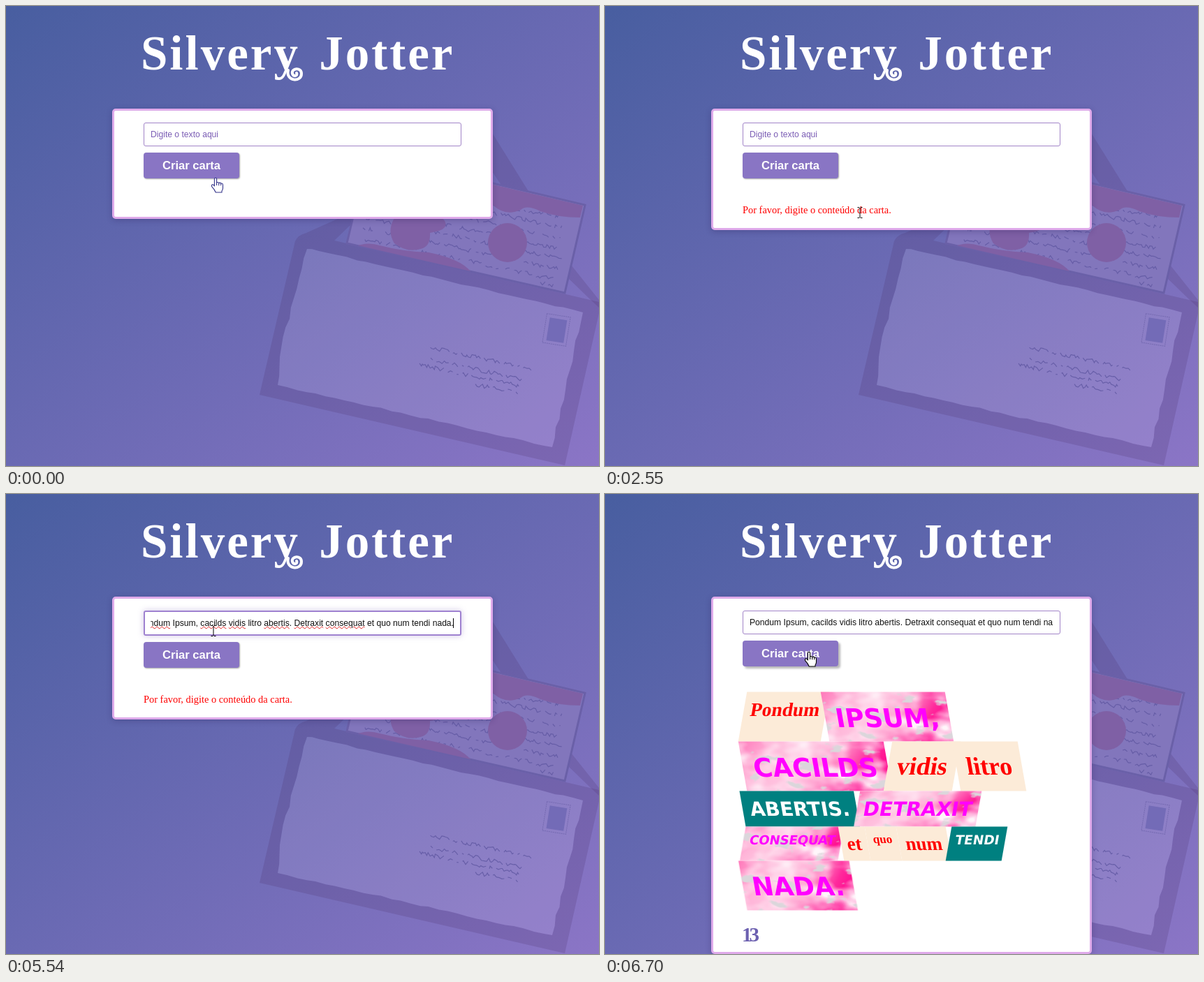
Write an HTML page that moves like this. It is 849 px wide and 659 px high and loops after 8000 ms.

```html
<!DOCTYPE html>
<html lang="pt">
<head>
<meta charset="utf-8">
<title>Silvery Jotter</title>
<style>
html, body { margin: 0; width: 100%; height: 100%; overflow: hidden; }
#stage {
  position: relative; width: 849px; height: 659px; overflow: hidden;
  background: linear-gradient(to bottom right, #485ea0, #8b75c6);
}
#stage > * { position: absolute; box-sizing: border-box; }
svg { left: 0; top: 0; }
.title { font: bold 69px "Liberation Serif", serif; letter-spacing: 3px; word-spacing: 7px; fill: #fff; }
.curl { fill: none; stroke: #fff; stroke-width: 4; stroke-linecap: round; }
.card {
  left: 152px; top: 147px; width: 545px; height: 158px;
  background: #fff; border: 3px solid #dfaaea; border-radius: 5px;
  box-shadow: 0 2px 8px rgba(40, 30, 90, .3);
}
.field { left: 197px; top: 167px; width: 455px; height: 34px; border: 1px solid #a284c8; border-radius: 3px; }
.text {
  left: 207px; top: 176px; width: 434px; height: 19px; overflow: hidden;
  display: flex; white-space: pre;
  font: 12.14px/16px "Liberation Sans", Arial, sans-serif; color: #111;
}
.hint { color: #7a5cb4; }
.typed { display: none; }
.caret { left: 208px; top: 178px; width: 1px; height: 14px; background: #000; visibility: hidden; }
.button {
  left: 197px; top: 210px; width: 137px; height: 37px; border-radius: 4px;
  background: #8975c4; color: #fff; text-align: center;
  font: bold 16.6px/37px "Liberation Sans", Arial, sans-serif;
  box-shadow: 1px 1px 2px rgba(0, 0, 0, .35);
}
.error { left: 197px; top: 283px; font: 14.4px/18px "Liberation Serif", serif; color: #f00; display: none; white-space: nowrap; }
.letter { display: none; }

.err .card { height: 174px; }
.err .error, .result .letter { display: block; }
.hover .button { box-shadow: 3px 3px 3px rgba(0, 0, 0, .28); }
.focus .card { height: 176px; }
.focus .field { height: 36px; border: 2px solid #9f82d0; box-shadow: 0 0 8px rgba(120, 90, 180, .35); }
.focus .text { top: 177px; }
.focus .button { top: 212px; }
.focus .error { top: 285px; }
.blink .caret { visibility: visible; }
.full .hint { display: none; }
.full .typed { display: block; }
.full.focus .text { justify-content: flex-end; }
.full.focus .caret { left: 640px; }
u { text-decoration: none; }
.spell u { text-decoration: underline wavy #e02020 .8px; text-underline-offset: 0; }
.result .card { height: 512px; }
</style>
</head>
<body>
<div id="stage">
  <svg width="849" height="659">
    <g id="post"></g>
    <text class="title" x="193" y="91">Silvery Jotter</text>
    <path class="curl" d="M404 92C400 108 423 110 423 97C423 87 408 89 410 97C412 102 418 100 416 96"/>
  </svg>
  <div class="card"></div>
  <div class="field"></div>
  <div class="text"><span class="hint">Digite o texto aqui</span><span class="typed"><u>Pondum</u> Ipsum, <u>cacilds</u> <u>vidis</u> litro <u>abertis</u>. <u>Detraxit</u> <u>consequat</u> et quo num tendi nada.</span></div>
  <div class="caret"></div>
  <div class="button">Criar carta</div>
  <div class="error">Por favor, digite o conteúdo da carta.</div>
  <svg class="letter" width="849" height="659">
    <defs>
      <linearGradient id="pink" x1="0" y1="0" x2="1" y2=".3">
        <stop offset="0" stop-color="#ff78ba"/>
        <stop offset=".25" stop-color="#ffb4d8"/>
        <stop offset=".5" stop-color="#ffc8e2"/>
        <stop offset=".7" stop-color="#ff8ec6"/>
        <stop offset=".9" stop-color="#ff2a9c"/>
        <stop offset="1" stop-color="#ff1493"/>
      </linearGradient>
      <filter id="cloud" x="0" y="0" width="1" height="1" color-interpolation-filters="sRGB">
        <feTurbulence type="fractalNoise" baseFrequency=".02 .03" numOctaves="3" seed="8"/>
        <feColorMatrix values="0 0 0 0 1  0 0 0 0 .96  0 0 0 0 .98  2.6 0 0 0 -1.05" result="white"/>
        <feTurbulence type="fractalNoise" baseFrequency=".03 .06" numOctaves="4" seed="3"/>
        <feColorMatrix values="0 0 0 0 .86  0 0 0 0 .84  0 0 0 0 .86  0 12 0 0 -7.6" result="grey"/>
        <feMerge result="all"><feMergeNode in="SourceGraphic"/><feMergeNode in="white"/><feMergeNode in="grey"/></feMerge>
        <feComposite in="all" in2="SourceAlpha" operator="in"/>
      </filter>
    </defs>
    <g id="tiles"></g>
    <text x="196" y="641" font-family="Liberation Serif, serif" font-weight="bold" font-size="29" letter-spacing="-4" fill="#6c60b0">13</text>
  </svg>
  <svg width="849" height="659">
    <circle id="click" r="10.5" fill="#e4cf14" fill-opacity=".68"/>
    <g id="hand" stroke="#000" stroke-width="1.1" stroke-linejoin="round">
      <path fill="#fff" d="M-1.6 1.8a1.6 1.6 0 0 1 3.2 0V7q1.6-1.2 3.1.5 1.7-.9 3 .6 2.6-.5 2.8 2.2V15q0 2-1.5 4v2H.2q-1.5-4-5.6-8.4-.6-2.6 1.2-2.8 1.4 0 2.6 2.2z"/>
      <path fill="none" d="M1.6 7v4M4.7 7.6v3.6M7.7 8.2v3"/>
    </g>
    <path id="beam" fill="none" stroke="#000" d="M-3.5-7.5h2.5l1 1 1-1h2.5M0-6.5v13M-3.5 7.5h2.5l1-1 1 1h2.5"/>
    <path id="arrow" fill="#fff" stroke="#000" d="M0 0v16l3.7-3.5 2.5 5.8 2.4-1-2.5-5.7h5.2z"/>
  </svg>
</div>
<script>
const $ = id => document.getElementById(id);
const stage = $('stage');

function add(parent, tag, attrs, text) {
  const el = document.createElementNS('http://www.w3.org/2000/svg', tag);
  for (const k in attrs) el.setAttribute(k, attrs[k]);
  if (text) el.textContent = text;
  return parent.appendChild(el);
}

// Background post: envelope, sheet and handwriting
let seed = 11;
const rnd = () => (seed = seed * 16807 % 2147483647) / 2147483647;

function rough(pts, amp) {
  const out = [];
  pts.forEach(([x, y], i) => {
    const [u, v] = pts[(i + 1) % pts.length];
    const n = Math.max(2, Math.round(Math.hypot(u - x, v - y) / 14));
    for (let k = 0; k < n; k++) {
      const j = k ? (rnd() - .5) * amp : 0;
      out.push([x + (u - x) * k / n + j, y + (v - y) * k / n + j]);
    }
  });
  return 'M' + out.map(p => p.map(c => c.toFixed(1)).join(' ')).join('L') + 'Z';
}

const post = $('post');
const shape = (d, fill, more) => add(post, 'path', { d, fill, ...more });

function scrawl(x, y, len, tall = 6) {
  let d = '', pen = false;
  for (let s = 0; s < len; s += 1.2 + rnd() * 2.8) {
    d += (pen ? 'L' : 'M') + (x + s).toFixed(1) + ' ' + (y + s * .21 + (rnd() - .5) * tall).toFixed(1);
    pen = rnd() > .2;
    if (!pen) s += 3;
  }
  shape(d, 'none', { stroke: '#5d559f', 'stroke-width': 1.2, 'stroke-opacity': .75 });
}

const DARK = 'rgba(80,50,110,.22)', PALE = 'rgba(255,235,255,.11)', RED = '#7f60a5';
const face = rough([[431, 348], [448, 351], [826, 439], [782, 632], [389, 543], [394, 490]], 2.6);

shape('M690 172L749 267L710 258L690 228ZM809 371L849 421V432L836 420L803 388ZM414 337Q418 328 430 325L497 295V310L470 336L440 329Z', DARK);
shape('M414 337L440 329L849 424V440L800 658L363 557Z' + face, DARK, { 'fill-rule': 'evenodd' });
shape(face, PALE);
shape('M518 212L829 285L800 411L488 340Z', '#8276bc', { stroke: '#6a60a8', 'stroke-width': 3 });
for (let i = 0; i < 8; i++) scrawl(508 + i % 3 * 3, 333 - i * 15, 283);
scrawl(765, 396, 20);
shape('M518 214L826 286L822 303Q790 303 765 294Q745 284 737 292Q715 302 697 285L640 270Z', RED);
shape('M504 343Q520 338 535 343Q570 352 605 353Q650 362 665 380Z', RED);
shape('M556 304Q545 322 556 340Q575 355 597 347Q608 342 607 325Q640 320 625 304Z', RED);
add(post, 'circle', { cx: 718, cy: 339, r: 28, fill: RED });
scrawl(603, 488, 150);
scrawl(608, 507, 132);
scrawl(592, 514, 145);
scrawl(672, 542, 62);
const stamp = add(post, 'g', { transform: 'translate(788 464) rotate(9)' });
add(stamp, 'rect', { x: -17, y: -21, width: 34, height: 42, fill: 'none', stroke: '#7469b0', 'stroke-dasharray': '2 1' });
add(stamp, 'rect', { x: -12, y: -16, width: 25, height: 33, fill: '#736bb7' });

// Ransom-note words by row height: text, width, lean, look, size, baseline
const rows = [
  [71, ['Pondum', 118, -1, 'cream', 27.4, 34], ['IPSUM,', 178, 1, 'pink', 37, 50]],
  [71, ['CACILDS', 208, 1, 'pink', 37, 50], ['vidis', 98, -1, 'cream', 36, 47], ['litro', 94, 1, 'cream', 36, 47]],
  [51, ['ABERTIS.', 163.5, 1, 'teal', 28, 35.5], ['DETRAXIT', 174.5, -1, 'pink', 28, 35.5]],
  [49, ['CONSEQUAT', 141, -1, 'pink', 18, 25], ['et', 38, 1, 'cream', 27, 33.5], ['quo', 45, 1, 'cream', 17, 23.5],
    ['num', 71, 1, 'cream', 27, 33.5], ['TENDI', 80, -1, 'teal', 18.5, 25]],
  [71, ['NADA.', 159, 1, 'pink', 36.5, 49.5]]
];
const looks = {
  cream: ['#fcebd8', '#f00', 'Liberation Serif, serif'],
  pink: ['url(#pink)', '#f0f', 'DejaVu Sans, sans-serif'],
  teal: ['#008080', '#fff', 'DejaVu Sans, sans-serif']
};
let top0 = 283.5;
for (const [h, ...words] of rows) {
  let x = 197;
  for (const [text, w, lean, look, size, base] of words) {
    const [fill, ink, font] = looks[look];
    const g = add($('tiles'), 'g', { transform: `translate(${x + w / 2} ${top0 + h / 2}) skewX(${10 * lean})` });
    const tile = add(g, 'rect', { x: -w / 2, y: -h / 2, width: w, height: h, fill });
    if (look === 'pink') tile.setAttribute('filter', 'url(#cloud)');
    add(g, 'text', {
      y: base - h / 2, fill: ink, 'text-anchor': 'middle',
      'font-family': font, 'font-size': size, 'font-weight': 'bold'
    }, text);
    x += w;
  }
  top0 += h;
}

// Pointer moves: first step, last step, number of steps, waypoints
const moves = [
  [70, 490, 6, [300, 246], [284, 231]],
  [1660, 2420, 11, [284, 231], [300, 262], [322, 290]],
  [2480, 2547, 2, [322, 290], [365, 296]],
  [2610, 3280, 11, [365, 296], [400, 304], [425, 280], [400, 230], [340, 195], [299, 181]],
  [3550, 3740, 4, [299, 181], [297, 191]],
  [5540, 5960, 7, [297, 191], [297, 202], [290, 222], [289, 230]],
  [6160, 6160, 1, [289, 230], [292, 226]]
];

function pointer(t) {
  let pos = moves[0][3];
  for (const [from, to, n, ...pts] of moves) {
    if (t < from) break;
    const step = n > 1 ? Math.min(n, Math.floor((t - from) / (to - from) * (n - 1) + 1e-6) + 1) : 1;
    const p = step / n * (pts.length - 1);
    const i = Math.min(pts.length - 2, Math.floor(p));
    pos = pts[i].map((c, k) => c + (pts[i + 1][k] - c) * (p - i));
  }
  return pos.map(Math.round);
}

function draw(t) {
  const within = (a, b) => t >= a && t < b;
  const [x, y] = pointer(t);
  const onButton = x >= 197 && x <= 334 && y >= 210 && y <= 247;
  const onText = y >= 167 && y <= 201 || t >= 1210 && y >= 283 && y <= 302;
  const kind = onButton ? 'hand' : onText ? 'beam' : 'arrow';
  const flags = {
    err: within(1210, 6700),
    focus: within(3940, 6560),
    full: t >= 5220,
    spell: within(5540, 6560),
    blink: within(3940, 4420) || within(4950, 5750) || within(6300, 6560),
    hover: onButton && t >= 70,
    result: t >= 6700
  };
  stage.className = Object.keys(flags).filter(k => flags[k]).join(' ');
  for (const id of ['hand', 'beam', 'arrow']) {
    $(id).style.display = id === kind ? '' : 'none';
    $(id).setAttribute('transform', `translate(${x} ${y})`);
  }
  $('hand').setAttribute('stroke', t < 70 ? '#34348a' : '#000');
  $('click').style.display = within(1130, 1210) || within(6560, 6700) ? '' : 'none';
  $('click').setAttribute('transform', `translate(${x} ${y})`);
}

const start = performance.now();
function tick() {
  draw((performance.now() - start) % 8000);
  requestAnimationFrame(tick);
}
tick();
</script>
</body>
</html>
```
